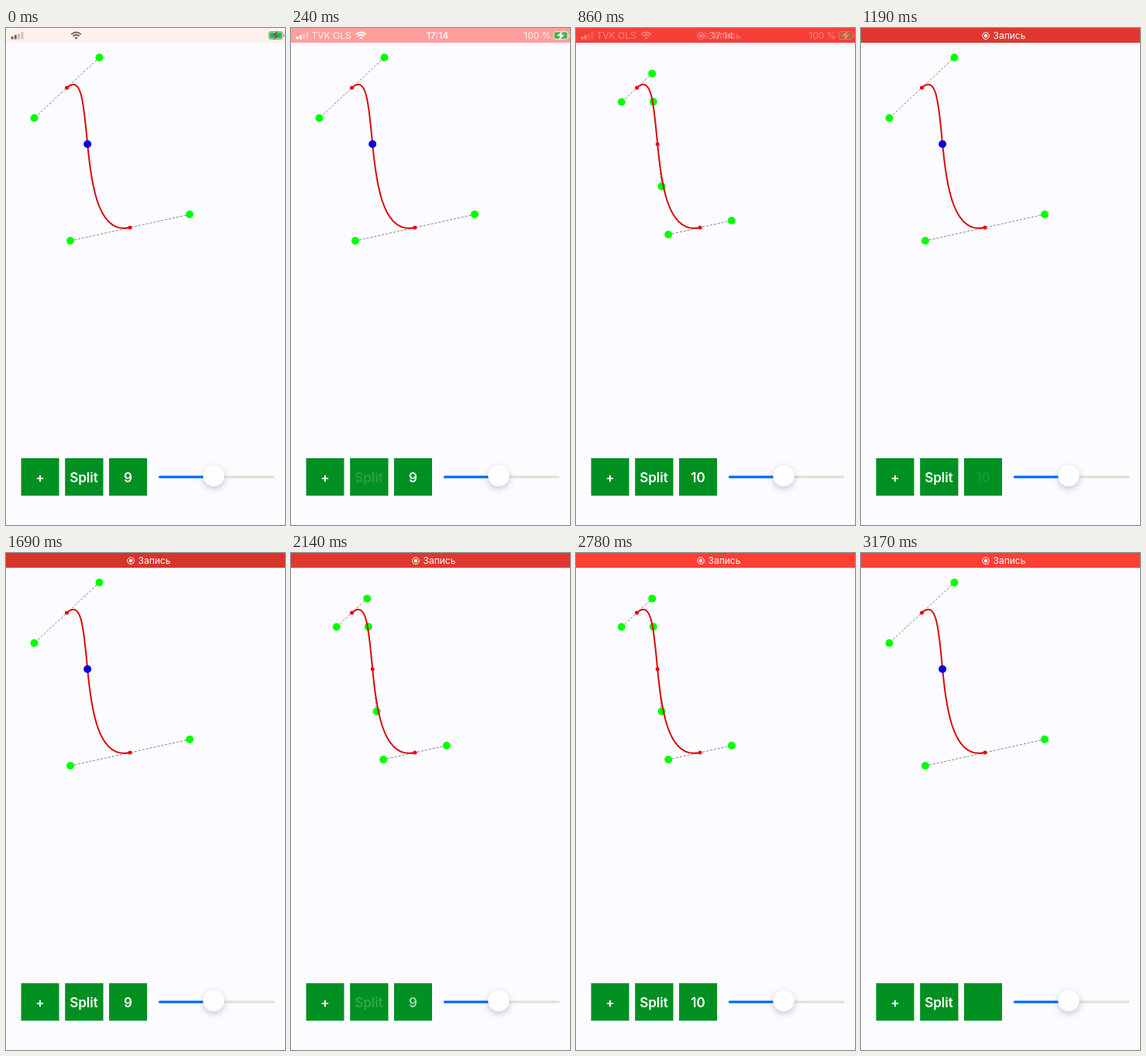
Recreate the animation shown at these times as an HTML page. Size 360 px wide and 640 px high, loop 3.19 s.

```html
<!DOCTYPE html>
<html lang="ru">
<head>
<meta charset="utf-8">
<title>Curve split</title>
<style>
html, body { margin: 0; width: 100%; height: 100%; overflow: hidden; background: #fcfbff; }
svg { display: block; width: 360px; height: 640px; font-family: Inter, "Noto Sans", sans-serif; }

.loop { animation: 3190ms linear infinite; }
.bar { animation-name: bar; }
.status { animation-name: status; }
.icons { color: #6a6864; animation-name: icons; }
.label { fill: #fff; font-size: 12px; animation-name: label; }
.mark { animation-name: mark; }
.rec { animation-name: rec; }
.whole { animation-name: whole; animation-timing-function: step-end; }
.split { animation-name: split; animation-timing-function: step-end; }
.press { animation-name: press; }
.nine { animation-name: nine; }
.ten { animation-name: ten; }

.button rect { fill: #009022; }
.button text { fill: #fff; font-size: 17px; font-weight: 600; text-anchor: middle; }
.guide { fill: none; stroke: #85827e; stroke-dasharray: 3 2; }
.handle { fill: #0f0; }
.curve { fill: none; stroke: #d80c0c; stroke-width: 2; }
.end { fill: #f00000; }
.thumb { fill: #fefdff; filter: drop-shadow(0 3px 4px rgba(60, 55, 60, .28)); }

@keyframes bar {
  0%, .63% { fill: #fff1ed; }
  7.52% { fill: #ff9f9d; }
  15.05%, 18.2% { fill: #fa4641; }
  25% { fill: #fc4039; }
  37.3% { fill: #e03830; }
  52% { fill: #d6342c; }
  67.1% { fill: #e03830; }
  78%, 100% { fill: #ff3f36; }
}
@keyframes icons {
  0%, .63% { color: #6a6864; }
  7.52%, 100% { color: #fff; }
}
@keyframes label {
  0%, .63% { opacity: 0; }
  7.52% { opacity: .85; }
  15.05%, 100% { opacity: 1; }
}
@keyframes mark {
  0%, 9% { opacity: 0; }
  15.05%, 100% { opacity: .75; }
}
@keyframes status {
  0%, 22% { opacity: 1; }
  29.8%, 100% { opacity: 0; }
}
@keyframes rec {
  0%, 24% { opacity: 0; }
  32%, 100% { opacity: 1; }
}
@keyframes whole {
  0% { opacity: 1; }
  18.17% { opacity: 0; }
  34.8% { opacity: 1; }
  66.15% { opacity: 0; }
  96.9%, 100% { opacity: 1; }
}
@keyframes split {
  0% { opacity: 0; }
  18.17% { opacity: 1; }
  34.8% { opacity: 0; }
  66.15% { opacity: 1; }
  96.9%, 100% { opacity: 0; }
}
@keyframes press {
  0%, 4.7% { opacity: 1; }
  4.71%, 18.16% { opacity: .16; }
  18.17% { opacity: .45; }
  25.1%, 31.3% { opacity: 1; }
  31.31%, 33.2% { opacity: .16; }
  36.7%, 58% { opacity: 1; }
  58.01%, 66.8% { opacity: .16; }
  74%, 90.9% { opacity: 1; }
  90.91%, 94.4% { opacity: .16; }
  98.4%, 100% { opacity: 1; }
}
@keyframes nine {
  0%, 18.16% { opacity: 1; }
  18.17% { opacity: .07; }
  18.8%, 37.6% { opacity: 0; }
  43.9%, 66.15% { opacity: 1; }
  67.1% { opacity: .65; }
  69.3%, 100% { opacity: 0; }
}
@keyframes ten {
  0%, 18.8% { opacity: 0; }
  25.1%, 34.8% { opacity: 1; }
  37.3% { opacity: .1; }
  37.6%, 69.3% { opacity: 0; }
  75.5%, 96.5% { opacity: 1; }
  98.75%, 100% { opacity: 0; }
}
</style>
</head>
<body>
<svg viewBox="0 0 360 640">
  <rect width="360" height="640" fill="#fcfbff"/>
  <rect class="loop bar" width="360" height="19"/>

  <g class="loop status">
    <g class="loop icons">
      <g fill="currentColor">
        <rect x="6.5" y="11" width="3" height="3.5" rx=".6"/>
        <rect x="10.8" y="9" width="3" height="5.5" rx=".6"/>
        <rect x="15.1" y="7" width="3" height="7.5" rx=".6" opacity=".35"/>
        <rect x="19.4" y="5" width="3" height="9.5" rx=".6" opacity=".35"/>
        <path d="M88.3 12.4Q90.5 10.6 92.7 12.4L90.5 14.7Z"/>
      </g>
      <path d="M84.2 8.2Q90.5 2.8 96.8 8.2M86.4 10.5Q90.5 7 94.6 10.5" fill="none" stroke="currentColor" stroke-width="1.8"/>
      <rect x="339" y="4.5" width="18" height="10" rx="2.5" fill="none" stroke="currentColor" opacity=".6"/>
      <path d="M358.7 8v3.5" stroke="currentColor" stroke-width="1.3" opacity=".7"/>
      <rect x="340" y="5.5" width="16" height="8" rx="1.4" fill="#30bc50"/>
      <path d="M350.5 3.5l-7.5 6.7h4.3l-1.7 5.3 7.6-6.8h-4.4z" fill="currentColor"/>
    </g>
    <g class="loop label">
      <text x="26.5" y="14">TVK OLS</text>
      <text x="189" y="14" font-weight="600" text-anchor="middle">17:14</text>
      <text x="335.5" y="14" text-anchor="end">100 %</text>
    </g>
    <g class="loop mark" fill="#fff">
      <circle cx="166.5" cy="10" r="3.6" fill="none" stroke="#fff"/>
      <circle cx="166.5" cy="10" r="1.6"/>
    </g>
  </g>

  <g class="loop rec" fill="#fff">
    <circle cx="161" cy="10" r="4.3" fill="none" stroke="#fff"/>
    <circle cx="161" cy="10" r="2.2"/>
    <text x="170.5" y="14" font-size="12">Запись</text>
  </g>

  <g id="whole" class="loop whole"></g>
  <g id="split" class="loop split"></g>
  <path id="curve" class="curve"/>
  <g id="ends"></g>
  <circle id="joint" class="loop whole" r="5" fill="#0000dc"/>

  <g class="button">
    <rect x="19.5" y="554" width="49" height="48.3"/>
    <rect x="76.2" y="554" width="49.3" height="48.3"/>
    <rect x="133" y="554" width="49" height="48.3"/>
    <text x="44" y="584.5">+</text>
    <text class="loop press" x="100.5" y="584.5">Split</text>
    <text class="loop nine" x="157.5" y="584.5">9</text>
    <text class="loop ten" x="157.5" y="584.5">10</text>
  </g>

  <g stroke-width="3.2" stroke-linecap="round">
    <path d="M268 578.2H345" stroke="#e4e0dc"/>
    <path d="M198.5 578.2H268" stroke="#006cfa"/>
  </g>
  <circle class="thumb" cx="268" cy="576.5" r="13.7"/>
</svg>
<script>
const $ = id => document.getElementById(id);
const T = 0.47; // slider value

const lerp = (a, b) => a.map((v, i) => v + (b[i] - v) * T);
const mirror = (p, c) => c.map((v, i) => 2 * v - p[i]);
const dot = (p, r, cls) => `<circle class="${cls}" cx="${p[0]}" cy="${p[1]}" r="${r}"/>`;

// A dashed guide through a knot, with a handle at each side.
const guide = (p, knot) => {
  const q = mirror(p, knot);
  return `<path class="guide" d="M${p}L${q}"/>` + dot(p, 5, "handle") + dot(q, 5, "handle");
};

const start = [78.5, 77], c1 = [120.5, 38], c2 = [83, 274], end = [160, 257];
const in1 = lerp(start, c1), mid = lerp(c1, c2), out2 = lerp(c2, end);
const in2 = lerp(mid, out2);
const knot = lerp(lerp(in1, mid), in2);

$("whole").innerHTML = guide(c1, start) + guide(c2, end);
$("split").innerHTML = guide(in1, start) + guide(in2, knot) + guide(out2, end);
$("curve").setAttribute("d", `M${start}C${c1} ${c2} ${end}`);
$("ends").innerHTML = [start, knot, end].map(p => dot(p, 2.5, "end")).join("");
$("joint").setAttribute("cx", knot[0]);
$("joint").setAttribute("cy", knot[1]);
</script>
</body>
</html>
```
